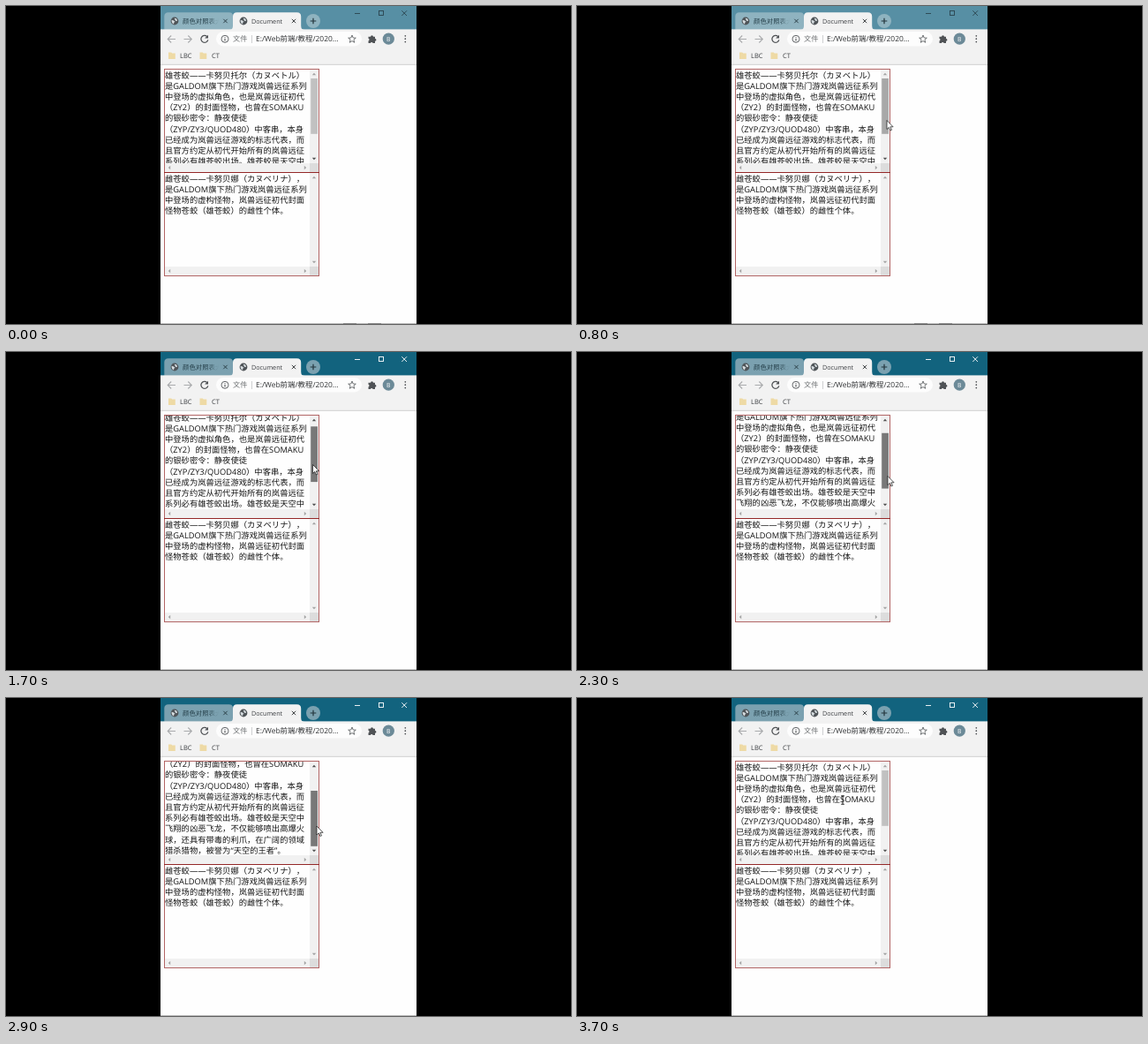
An HTML page for the animation above (4 s loop, 640 by 360 pixels).

```html
<!DOCTYPE html>
<html lang="zh-CN">
<head>
<meta charset="utf-8">
<title>Scroll boxes</title>
<style>
  html, body { margin: 0; width: 100%; height: 100%; overflow: hidden; background: #000; }
  svg { display: block; width: 640px; height: 360px; }
  text { font-family: 'Open Sans', 'Noto Sans CJK SC', 'Noto Sans CJK', sans-serif; text-rendering: geometricPrecision; text-spacing-trim: space-all; white-space: pre; }
  .body text { font-size: 9.3px; fill: #141414; }
  .line { fill: none; stroke: #505356; stroke-width: 1.1; }
</style>
</head>
<body>
<svg viewBox="0 0 640 360">
  <defs>
    <clipPath id="win"><rect x="175" width="290" height="360"/></clipPath>
    <clipPath id="view"><rect x="180" y="72" width="164" height="106"/></clipPath>
    <linearGradient id="fade" gradientUnits="userSpaceOnUse" x1="228" x2="241" y1="0" y2="0">
      <stop offset="0" stop-color="#223c46"/>
      <stop offset="1" stop-color="#223c46" stop-opacity="0"/>
    </linearGradient>
    <g id="globe">
      <circle r="4.4" fill="#4f5458"/>
      <path d="M-3.4 -1.2L-1 -.6L.4 .8L-.6 1.6L-1 3.4Q-3.6 2.4 -3.4 -1.2ZM-.4 -3.2L2 -2.8L3.2 -.4L1.4 .2L.6 -1.2Z" fill="#d5dcdf"/>
    </g>
    <path id="cross" d="M-2.2 -2.2L2.2 2.2M2.2 -2.2L-2.2 2.2"/>
    <path id="folder" d="M-4 -3.6H-.8L.2 -2.6H3.8V4H-4Z" fill="#eedaa5"/>
  </defs>
  <rect width="640" height="360"/>
  <g clip-path="url(#win)">
    <rect x="175" width="290" height="360" fill="#fefefe"/>
    <rect id="bar" x="175" width="290" height="28"/>
    <path id="tab" d="M179.3 27V11.8Q179.3 7.2 184 7.2H252.5Q257 7.2 257 11.8V27Z"/>
    <path d="M252.5 27Q257 27 257 22.4V11.8Q257 7.2 261.6 7.2H329.6Q334.2 7.2 334.2 11.8V22.4Q334.2 27 338.8 27Z" fill="#f2f2f2"/>
    <rect x="175" y="26.4" width="290" height="39.6" fill="#f2f2f2"/>
    <rect x="175" y="65.8" width="290" height="1" fill="#cfcfcf"/>
    <use href="#globe" x="191" y="17"/>
    <text x="200" y="19.8" font-size="7.4" fill="url(#fade)">颜色对照表大</text>
    <use href="#cross" x="248.5" y="17" stroke="#2b4048"/>
    <use href="#globe" x="269" y="17"/>
    <text x="278" y="19.7" font-size="7.2" fill="#3a3d40">Document</text>
    <use href="#cross" x="326" y="17" stroke="#45484a"/>
    <circle id="add" cx="348" cy="17" r="8"/>
    <path d="M344.7 17H351.3M348 13.7V20.3" stroke="#23343b" stroke-width="1.2"/>
    <g id="controls" fill="none" stroke-width=".9">
      <path d="M395 8.5H401"/>
      <rect x="422.5" y="5.5" width="5" height="5"/>
      <path d="M448.3 5.3L454 11M454 5.3L448.3 11"/>
    </g>

    <path class="line" d="M192 37.5H183.5M187.2 33.5L183.2 37.5L187.2 41.5M201.5 37.5H210M206.3 33.5L210.3 37.5L206.3 41.5" style="stroke:#a9abad"/>
    <path class="line" d="M227.8 34.6A4 4 0 1 0 228.8 38.3" style="stroke-width:1.3"/>
    <path d="M229 32.7V36.6H225.1Z" fill="#505356"/>
    <rect x="238" y="29" width="165" height="16.5" rx="8.2" fill="#fdfdfd"/>
    <circle class="line" cx="248" cy="37.3" r="4" style="stroke-width:.9"/>
    <path class="line" d="M248 36.7V39.5M248 34.9V35.8"/>
    <text x="257" y="40.4" font-size="8.2" fill="#6b6e70">文件</text>
    <path d="M278.5 33V42" stroke="#c3c5c7" stroke-width=".8"/>
    <text x="283" y="40.4" font-size="8.45" fill="#303234">E:/Web前端/教程/2020...</text>
    <path class="line" d="M392 33L393.2 36L396.3 36.2L393.9 38.2L394.7 41.3L392 39.6L389.3 41.3L390.1 38.2L387.7 36.2L390.8 36Z" style="stroke-width:.8"/>
    <path d="M410.5 34.8H413A1.5 1.5 0 0 1 416 34.8H418V37A1.4 1.4 0 0 1 418 39.8V42H415.6A1.5 1.5 0 0 0 412.8 42H410.5V39.6A1.5 1.5 0 0 0 410.5 36.8Z" fill="#505356"/>
    <circle cx="433.3" cy="37.2" r="6.6" fill="#6c8a98"/>
    <text x="433.3" y="39.7" font-size="6.8" fill="#fff" text-anchor="middle">B</text>
    <path d="M452.3 33.8V33.81M452.3 37.2V37.21M452.3 40.6V40.61" stroke="#505356" stroke-width="1.7" stroke-linecap="round"/>
    <use href="#folder" x="188" y="56"/>
    <text x="197" y="58.9" font-size="7.5" fill="#3a3d40">LBC</text>
    <use href="#folder" x="223.5" y="56"/>
    <text x="233" y="58.9" font-size="7.5" fill="#3a3d40">CT</text>

    <g class="body">
      <g clip-path="url(#view)"><g id="story"></g></g>
      <g id="note"></g>
    </g>
    <g id="frames"></g>
    <rect id="thumb" x="345.2" width="7.7" height="62.8"/>
    <path id="up" d="M346.8 78.2H351.2L349 75.8Z"/>
    <path d="M346.8 171.8H351.2L349 174.2Z" fill="#505050"/>
    <rect x="175" y="359" width="290" height="1" fill="#b9b9b9"/>
    <path id="edge" d="M382 359.5H397M410 359.5H425" stroke="#858585"/>
    <path id="arrow" d="M0 0V10L2.3 7.9L3.9 11.5L5.5 10.8L3.9 7.3H7.1Z" fill="#fff" stroke="#111" stroke-width=".7"/>
    <path id="beam" d="M-1.8 0H1.8M0 0V9.5M-1.8 9.5H1.8" fill="none" stroke="#111" stroke-width=".9"/>
  </g>
</svg>
<script>
const NS = 'http://www.w3.org/2000/svg';
const $ = id => document.getElementById(id);
const LOOP = 4000, STEP = 100, PITCH = 12.2;

const story = [
  '雄苍蛟——卡努贝托尔（カヌベトル）',
  '是GALDOM旗下热门游戏岚兽远征系列',
  '中登场的虚拟角色，也是岚兽远征初代',
  '（ZY2）的封面怪物，也曾在SOMAKU',
  '的银砂密令：静夜使徒',
  '（ZYP/ZY3/QUOD480）中客串，本身',
  '已经成为岚兽远征游戏的标志代表，而',
  '且官方约定从初代开始所有的岚兽远征',
  '系列必有雄苍蛟出场。雄苍蛟是天空中',
  '飞翔的凶恶飞龙，不仅能够喷出高爆火',
  '球，还具有带毒的利爪，在广阔的领域',
  '猎杀猎物，被誉为“天空的王者”。'
];
const note = [
  '雌苍蛟——卡努贝娜（カヌベリナ），',
  '是GALDOM旗下热门游戏岚兽远征系列',
  '中登场的虚构怪物，岚兽远征初代封面',
  '怪物苍蛟（雄苍蛟）的雌性个体。'
];

function add(parent, tag, attrs, text = '') {
  const el = document.createElementNS(NS, tag);
  for (const k in attrs) el.setAttribute(k, attrs[k]);
  el.textContent = text;
  parent.append(el);
}

function paragraph(id, lines, y) {
  lines.forEach((s, i) => add($(id), 'text', { x: 180, y: y + i * PITCH }, s));
}

function scrollBox(y, disabled) {
  const g = $('frames');
  const rect = (x, y, width, height, fill) => add(g, 'rect', { x, y, width, height, fill });
  const mark = d => add(g, 'path', { d, fill: '#a3a3a3' });
  rect(344, y + 1, 10, 106, '#f1f1f1');
  rect(180, y + 107, 164, 10, '#f1f1f1');
  rect(344, y + 107, 10, 10, '#dcdcdc');
  mark(`M186.2 ${y + 109.8}V${y + 114.2}L183.8 ${y + 112}Z`);
  mark(`M337.8 ${y + 109.8}V${y + 114.2}L340.2 ${y + 112}Z`);
  if (disabled) {
    mark(`M346.8 ${y + 7.2}H351.2L349 ${y + 4.8}Z`);
    mark(`M346.8 ${y + 100.8}H351.2L349 ${y + 103.2}Z`);
  }
  // translucent, so the shared edge of the two boxes comes out darker
  add(g, 'rect', { x: 179.5, y: y + .5, width: 175, height: 117, fill: 'none', stroke: '#800000', 'stroke-opacity': .6 });
}

paragraph('story', story, 81.6);
paragraph('note', note, 198.8);
scrollBox(71, false);
scrollBox(188, true);

// time, pointer x, pointer y, scroll offset
const keys = [
  [700, 385, 146, 0], [800, 351, 129.5, 0], [1100, 347, 125, 0],
  [1500, 347.5, 125.5, 0], [1700, 347.5, 127.5, 4], [2300, 352, 140.5, 17],
  [2600, 352, 138.5, 33], [2900, 352, 145, 40], [3100, 310, 130, 40],
  [3200, 299, 121, 36.5], [3300, 300, 115, 14], [3400, 301, 111, 0],
  [4000, 301, 110.5, 0]
];

function sample(t) {
  if (t <= keys[0][0]) return keys[0].slice(1);
  const i = keys.findIndex(k => k[0] >= t);
  const a = keys[i - 1], b = keys[i];
  const p = (t - a[0]) / (b[0] - a[0]);
  return [1, 2, 3].map(n => a[n] + (b[n] - a[n]) * p);
}

const set = (id, name, value) => $(id).setAttribute(name, value);

function draw(time) {
  const t = Math.floor(time % LOOP / STEP) * STEP;
  const [x, y, scroll] = sample(t);
  const active = t >= 1100;
  const onText = x < 344;
  const drag = active && t < 3000;
  const hover = t >= 800 && t < 1100;

  set('bar', 'fill', active ? '#12637e' : '#578fa4');
  set('tab', 'fill', active ? '#7ba1b0' : '#8fb3c0');
  set('add', 'fill', active ? '#7ba1b0' : '#8fb3c0');
  set('controls', 'stroke', active ? '#fff' : '#2b444e');
  set('edge', 'visibility', active ? 'hidden' : 'visible');

  set('story', 'transform', `translate(0 ${-scroll})`);
  set('thumb', 'y', 82 + scroll * .575);
  set('thumb', 'fill', drag ? '#787878' : hover ? '#a8a8a8' : '#c1c1c1');
  set('up', 'fill', scroll > 0 ? '#505050' : '#a3a3a3');

  for (const [id, on] of [['arrow', !onText], ['beam', onText]]) {
    set(id, 'visibility', t >= 700 && on ? 'visible' : 'hidden');
    set(id, 'transform', `translate(${x} ${y})`);
  }
}

const start = performance.now();
function tick(now) {
  draw(Math.max(0, now - start));
  requestAnimationFrame(tick);
}
draw(0);
requestAnimationFrame(tick);
</script>
</body>
</html>
```
